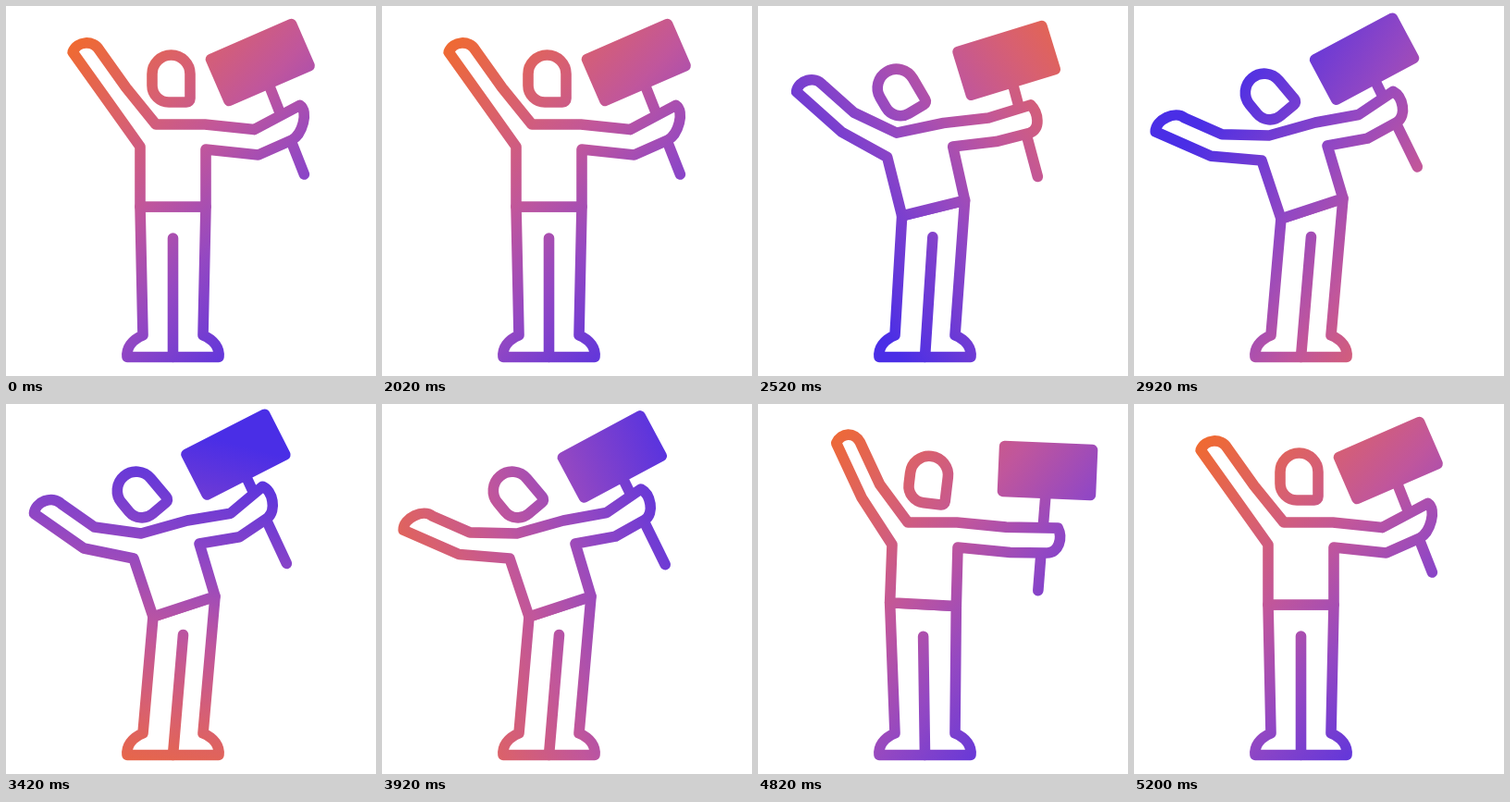
Animation, 400 px wide and 400 px high, one loop 5220 ms. Source, as an HTML page with a canvas:

```html
<!DOCTYPE html>
<html lang="en">
<head>
<meta charset="utf-8">
<title>Protester with a sign</title>
<style>
  html, body { margin: 0; width: 100%; height: 100%; overflow: hidden; background: #fff; }
  canvas { display: block; width: 400px; height: 400px; }
</style>
</head>
<body>
<canvas id="stage" width="400" height="400"></canvas>
<script>
const ctx = document.getElementById('stage').getContext('2d');
const LOOP = 5220, START = 2020, END = 5200;
const STROKE = 11.6, FLOOR = 379.5, STICK = 130;
const RAD = Math.PI / 180;

// Limb angles in degrees: the free arm (upper, fore), the arm holding
// the sign (reach, grip) and the stick. lean tips the whole body left.
const raised = { lean: 0, upper: 54.5, fore: 54.5, reach: 6, grip: -28, stick: -21.5 };
const level = { lean: -0.17, upper: 57, fore: 65, reach: 5.5, grip: 1, stick: 4.5 };
const leaning = { lean: 0.76, upper: 29, fore: 41.7, reach: -6.5, grip: -17, stick: -15 };
const tilted = { lean: 1, upper: 11.5, fore: 35, reach: -9.5, grip: -40, stick: -25 };
const waving = { lean: 1, upper: 6.3, fore: 26.2, reach: -10.3, grip: -34.5, stick: -26.2 };
const farWave = { ...waving, upper: 4.7, fore: 23.6 };
const overswing = { ...raised, upper: 52, fore: 48 };

const keys = [
  [START, raised], [2210, level], [2520, leaning], [2950, farWave],
  [3420, tilted], [3850, farWave], [4420, waving], [4820, level],
  [5060, overswing], [END, raised]
];

// Harmonic mean of the neighbouring slopes: smooth, without overshoot.
function slope(k, name) {
  if (k === 0 || k === keys.length - 1) return 0;
  const [t0, a] = keys[k - 1], [t1, b] = keys[k], [t2, c] = keys[k + 1];
  const s0 = (b[name] - a[name]) / (t1 - t0);
  const s1 = (c[name] - b[name]) / (t2 - t1);
  return s0 * s1 <= 0 ? 0 : 2 * s0 * s1 / (s0 + s1);
}

function poseAt(t) {
  if (t <= START || t >= END) return raised;
  let k = 0;
  while (t >= keys[k + 1][0]) k++;
  const [t0, a] = keys[k], [t1, b] = keys[k + 1];
  const d = t1 - t0, u = (t - t0) / d, v = 1 - u, pose = {};
  for (const n in a) {
    pose[n] = a[n] * (1 + 2 * u) * v * v + b[n] * u * u * (3 - 2 * u) +
      d * u * v * (slope(k, n) * v - slope(k + 1, n) * u);
  }
  return pose;
}

// The gradient makes one turn and slows down towards the end.
function paintAt(t) {
  const u = Math.min(1, Math.max(0, (t - START) / (END - START)));
  const p = 1 - Math.pow(1 - u, 1.9);
  const shift = 55 * Math.sin(Math.PI * Math.pow(p, 0.6));
  const [x0, y0] = step([200, 200], -205 - shift, 44 + 360 * p);
  const [x1, y1] = step([200, 200], 198 - shift, 44 + 360 * p);
  const g = ctx.createLinearGradient(x0, y0, x1, y1);
  g.addColorStop(0, '#f06a30');
  g.addColorStop(0.26, '#d86070');
  g.addColorStop(0.45, '#c0569c');
  g.addColorStop(0.66, '#9448c2');
  g.addColorStop(1, '#4a2ee6');
  return g;
}

function step([x, y], len, deg) {
  return [x + len * Math.cos(deg * RAD), y + len * Math.sin(deg * RAD)];
}

const middle = (a, b) => [(a[0] + b[0]) / 2, (a[1] + b[1]) / 2];
const to = p => ctx.lineTo(...p);
const curve = (a, b, c) => ctx.bezierCurveTo(...a, ...b, ...c);

function line(...pts) {
  ctx.beginPath();
  pts.forEach(to);
  ctx.stroke();
}

function turned([x, y], deg, draw) {
  ctx.save();
  ctx.translate(x, y);
  ctx.rotate(deg * RAD);
  ctx.beginPath();
  draw();
  ctx.restore();
}

function outline() {
  ctx.fillStyle = '#fff';
  ctx.fill();
  ctx.stroke();
}

function buildRig(p) {
  const { lean, upper, fore, reach, grip } = p;
  const bend = Math.max(lean, 0);
  const sway = (x, y, dx, dy, by = bend) => [x + dx * by, y + dy * by];
  const r = {
    waistL: sway(145, 217, 14, 13, lean),
    waistR: sway(216, 217, 10, -9, lean),
    crotch: sway(180.5, 251, 11, -1.5, lean),
    armpitL: sway(145, 152, -7, 15),
    shoulderL: sway(162, 128, -16, 12),
    shoulderR: sway(215, 128, -19, -2),
    armpitR: sway(216, 155, -7, -4),
    head: [178.5 - 34.5 * lean, 78.5 + 19 * Math.abs(lean)]
  };
  r.elbowOut = step(r.armpitL, 60 - 5 * bend, 180 + upper);
  r.handOut = step(r.elbowOut, 65.5, 180 + fore);
  r.elbowIn = step(r.shoulderL, 51, 176.5 + upper);
  r.handIn = step(r.elbowIn, 50 - 6 * bend, 180 + fore);

  r.elbowTop = step(r.shoulderR, 53.5 - 6 * bend, reach);
  r.fistTop = step(r.elbowTop, 56 - 11 * bend, grip);
  r.elbowLow = step(r.armpitR, 57 - 13 * bend, reach);
  r.fistLow = step(r.elbowLow, 39.5 - 3 * bend, grip * 0.85);

  const hold = step(middle(r.fistTop, r.fistLow), 5 * Math.abs(lean) - 12, grip);
  const above = 76 - 14 * lean * lean;
  r.board = step(hold, -above, 90 + p.stick);
  r.stickEnd = step(r.board, STICK, 90 + p.stick);
  return r;
}

function drawSign(r, deg) {
  line(r.board, r.stickEnd);
  turned(r.board, deg - 2, () => ctx.rect(-47.5, -24.5, 95, 49));
  ctx.fillStyle = ctx.strokeStyle;
  ctx.fill();
  ctx.stroke();
}

function drawLegs(r) {
  ctx.beginPath();
  to(r.waistL);
  to([148, 356]);
  curve([136, 361], [130, 370], [131, FLOOR]);
  to([230, FLOOR]);
  curve([231, 370], [225, 361], [213, 356]);
  to(r.waistR);
  ctx.closePath();
  outline();
  line(r.crotch, [180.5, FLOOR]);
}

function drawBody(r, p) {
  ctx.beginPath();
  [r.waistL, r.armpitL, r.elbowOut, r.handOut].forEach(to);
  // Fingertips bulge at right angles to the line across the hand.
  const across = Math.atan2(r.handIn[1] - r.handOut[1], r.handIn[0] - r.handOut[0]) / RAD;
  curve(step(r.handOut, 13, across - 65), step(r.handIn, -13, across + 65), r.handIn);
  [r.elbowIn, r.shoulderL, r.shoulderR, r.elbowTop, r.fistTop].forEach(to);
  curve(step(r.fistTop, 12, p.grip + 62), step(r.fistLow, 13, p.grip), r.fistLow);
  [r.elbowLow, r.armpitR, r.waistR].forEach(to);
  ctx.closePath();
  outline();
}

function drawHead(r, lean) {
  turned(r.head, -40 * lean, () => {
    ctx.arc(0, -5, 20.5, Math.PI, 0);
    ctx.arcTo(20.5, 25.5, 0, 25.5, 4);
    ctx.arc(-2.5, 7.5, 18, Math.PI / 2, Math.PI);
    ctx.closePath();
  });
  ctx.stroke();
}

function frame() {
  const t = performance.now() % LOOP;
  const p = poseAt(t), r = buildRig(p);
  ctx.fillStyle = '#fff';
  ctx.fillRect(0, 0, 400, 400);
  ctx.lineWidth = STROKE;
  ctx.lineCap = ctx.lineJoin = 'round';
  ctx.strokeStyle = paintAt(t);
  drawSign(r, p.stick);
  drawLegs(r);
  drawBody(r, p);
  drawHead(r, p.lean);
  requestAnimationFrame(frame);
}
frame();
</script>
</body>
</html>
```
